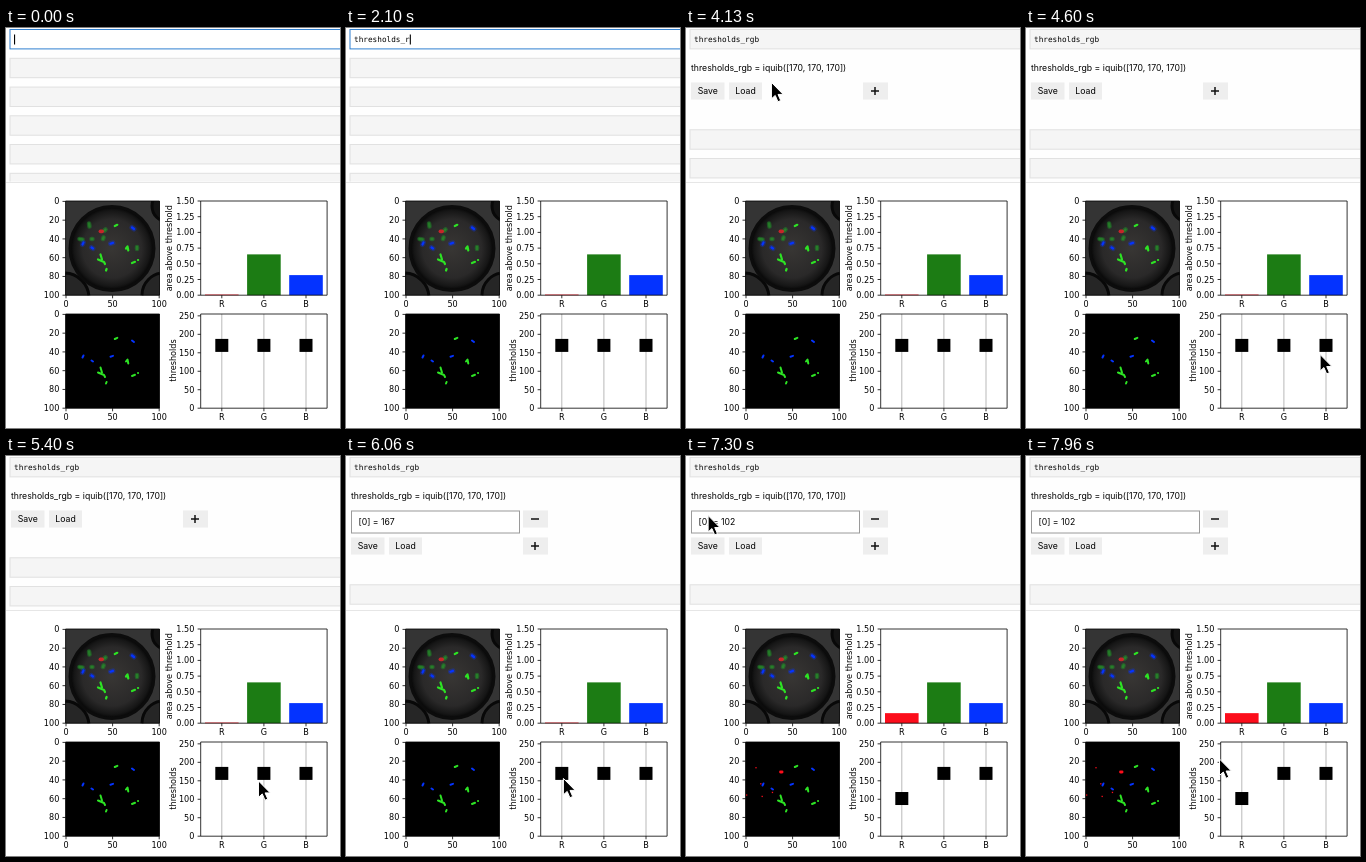
These frames come from a looping animation (334x400 px, 8000 ms). An HTML page:

```html
<!DOCTYPE html>
<html lang="en">
<head>
<meta charset="utf-8">
<title>Threshold notebook</title>
<style>
html, body { margin: 0; width: 100%; height: 100%; overflow: hidden; background: #fff; }
svg { display: block; width: 100vw; height: 100vh; }
text { white-space: pre; }
.ui { font-family: Inter, "Liberation Sans", sans-serif; font-size: 8.7px; fill: #000; }
.code { font-family: "DejaVu Sans Mono", monospace; font-size: 7.72px; fill: #000; }
.plot { font-family: "DejaVu Sans", sans-serif; font-size: 8.1px; fill: #000; }
</style>
</head>
<body>
<svg id="stage" viewBox="0 0 334 400" preserveAspectRatio="none">
  <defs>
    <clipPath id="bookClip"><rect width="334" height="153.5"/></clipPath>
    <clipPath id="photoClip"><rect x="59.5" y="173" width="94" height="94.3"/></clipPath>
    <radialGradient id="drop">
      <stop offset="0" stop-color="#383634"/>
      <stop offset=".7" stop-color="#2a2929"/>
      <stop offset=".9" stop-color="#161616"/>
      <stop offset="1" stop-color="#040404"/>
    </radialGradient>
  </defs>
</svg>
<script>
const LOOP = 8000;
const CODE = 'thresholds_rgb';
const CHAR = 4.648;
const RED = '#fc0d1b', GREEN = '#1c7c14', BLUE = '#0433ff', LIME = '#2de324';
const stage = document.getElementById('stage');

function add(parent, tag, attrs, text) {
  const el = document.createElementNS('http://www.w3.org/2000/svg', tag);
  set(el, attrs);
  if (text !== undefined) el.textContent = text;
  parent.appendChild(el);
  return el;
}
function set(el, attrs) {
  for (const k in attrs) el.setAttribute(k, attrs[k]);
}
function show(el, on) {
  el.setAttribute('visibility', on ? 'inherit' : 'hidden');
}
const clamp = v => Math.min(1, Math.max(0, v));
const group = (parent, attrs = {}) => add(parent, 'g', attrs);
const rect = (parent, x, y, width, height, fill, more = {}) =>
  add(parent, 'rect', { x, y, width, height, fill, ...more });
const label = (parent, x, y, text, cls, anchor = 'start') =>
  add(parent, 'text', { x, y, class: cls, 'text-anchor': anchor }, text);
const line = (parent, d, stroke = '#000', width = .8, more = {}) =>
  add(parent, 'path', { d, stroke, 'stroke-width': width, fill: 'none', ...more });

// Notebook
const book = group(stage, { 'clip-path': 'url(#bookClip)' });
rect(book, 0, 0, 334, 154, '#fefefe');
const cell = (parent, y) =>
  rect(parent, 4, y, 340, 19.4, '#f5f5f5', { stroke: '#e0e0e0', 'stroke-width': 1 });
const active = cell(book, 1.5);
const code = label(book, 8, 14.2, '', 'code');
const caret = rect(book, 8, 6.5, 1.1, 10, '#000');
const rest = group(book);
for (let i = 0; i < 5; i++) cell(rest, 30.3 + i * 28.75);

const output = label(book, 5, 42.6, CODE + ' = iquib([170, 170, 170])', 'ui');
function button(parent, x, y, w, text) {
  rect(parent, x, y, w, 17, '#eee');
  label(parent, x + w / 2, y + 11.6, text, 'ui', 'middle');
}
function signButton(parent, y, plus) {
  rect(parent, 177, y, 25, 17, '#eee');
  const cy = y + 8.5;
  line(parent, `M185 ${cy}h8` + (plus ? `M189 ${cy - 4}v8` : ''), '#111', 1.5);
}
const controls = group(book);
button(controls, 5, 54.5, 33.5, 'Save');
button(controls, 43, 54.5, 33, 'Load');
signButton(controls, 54.5, true);
const override = group(book);
rect(override, 5.5, 55, 168, 22, '#fff', { stroke: '#9a9a9a', 'stroke-width': 1 });
const valueText = label(override, 12.5, 69, '', 'ui');
signButton(override, 54.5, false);
line(stage, 'M0 154.5H334', '#e6e6e6', 1);

// Microscope picture in simple shapes
const photo = group(stage, { 'clip-path': 'url(#photoClip)' });
rect(photo, 59, 173, 95, 95, '#343434');
function disc(cx, cy, r, fill, stroke) {
  add(photo, 'circle', { cx, cy, r, fill, stroke, 'stroke-width': 3 });
}
disc(58, 270, 25, '#262626', '#080808');
disc(158, 267, 22, '#262626', '#080808');
disc(162, 178, 16, '#141414', '#080808');
disc(106, 220.5, 42, 'url(#drop)', '#0c0c0c');

const mask = group(stage);
rect(mask, 59.5, 286, 94, 94.3, '#000');

// Cells are short round strokes; bright ones appear in both pictures
const round = { 'stroke-linecap': 'round', 'stroke-linejoin': 'round' };
const blues = 'M76.5 216.5l1-2M85.5 219.5l1.5 1M104.5 215.7l2.5-.8M126 199.5l2 1.5';
const greens = 'M108.8 198l2.5-1.2M94.5 226.5l1.5 5M92 231.5l6 2.5l1 2M100 242.5l.6-1.5' +
  'M120 220.5l1.5-2l.8 4M126 235l3-1.2M132 232h.1';
const dim = 'M83 195.5l.5 3M73.5 211l3 .5M85.5 211h1M98.5 202.5l1-1M97 211l.6-1.6M131 219v2';
line(photo, dim, '#1f8a28', 4.6, { ...round, opacity: .5 });
line(photo, dim, '#28962a', 2.4, { ...round, opacity: .6 });
line(photo, blues, BLUE, 5, { ...round, opacity: .3 });
line(photo, 'M94.5 203.3h1.6', '#d8232a', 3.8, { ...round, opacity: .9 });
for (const [d, color] of [[blues, BLUE], [greens, LIME]]) {
  line(photo, d, color, 2.2, round);
  line(mask, d, color, 2, { ...round, transform: 'translate(0 113)' });
}
const redCell = line(mask, 'M94.5 316h1.6', RED, 2, round);

// Sparse red noise from a small seeded generator
const specks = group(mask);
let seed = 11;
const random = () => (seed = seed * 16807 % 2147483647) / 2147483647;
for (let i = 0; i < 5; i++)
  rect(specks, 60 + random() * 30, 308 + random() * 68, 1.3, 1.3, RED);

// Plots
function frame(x, y, w) {
  line(stage, `M${x} ${y}h${w}v94.2h${-w}z`);
}
function yTick(x, y, text) {
  line(stage, `M${x} ${y}h-3.1`);
  label(stage, x - 6.3, y + 3, text, 'plot', 'end');
}
function xTick(x, y, text) {
  line(stage, `M${x} ${y}v3.1`);
  label(stage, x, y + 12.1, text, 'plot', 'middle');
}
function title(x, y, text) {
  add(stage, 'text', { class: 'plot', 'text-anchor': 'middle', transform: `translate(${x} ${y}) rotate(-90)` }, text);
}
const barY = v => 267.2 - v * 62.8;
const levelY = v => 380.2 - v * .3694;
const columns = [0, 1, 2].map(i => 215.8 + i * 42.1);

const bars = [.01, .65, .32].map((v, i) =>
  rect(stage, columns[i] - 16.8, barY(v), 33.6, v * 62.8, [RED, GREEN, BLUE][i]));
columns.forEach(x => line(stage, `M${x} 286V380`, '#b9b9b9', 1));
const knobs = columns.map(x => rect(stage, x - 6.5, levelY(170) - 6.5, 13, 13, '#000'));

for (const top of [173, 286]) {
  frame(59.6, top, 93.9);
  frame(194.7, top, 126.4);
  for (let v = 0; v <= 100; v += 20) yTick(59.6, top + .4 + v * .938, v);
  for (let v = 0; v <= 100; v += 50) xTick(60 + v * .932, top + 94.2, v);
  columns.forEach((x, i) => xTick(x, top + 94.2, 'RGB'[i]));
}
for (let v = 0; v <= 1.5; v += .25) yTick(194.7, barY(v), v.toFixed(2));
for (let v = 0; v <= 250; v += 50) yTick(194.7, levelY(v), v);
title(166, 220.3, 'area above threshold');
title(169.7, 332.5, 'thresholds');

// Pointers
const arrow = add(stage, 'path', {
  d: 'M0 0V16.4L3.8 13L6.5 19.3L9.3 18.1L6.6 12H11.8Z',
  fill: '#000', stroke: '#fff', 'stroke-width': 1, 'stroke-linejoin': 'round'
});
const beam = group(stage);
const beamPath = 'M-3.5 -8.5Q0 -8.5 0 -6Q0 -8.5 3.5 -8.5M0 -6V6M-3.5 8.5Q0 8.5 0 6Q0 8.5 3.5 8.5M-1.8 2.5H1.8';
line(beam, beamPath, '#fff', 3);
line(beam, beamPath, '#000', 1.3);

// Each leg eases to a stop; bow bends it vertically
const legs = [
  { from: 3630, to: 4120, x: 82, y: 50 },
  { from: 4120, to: 4430, x: 147, y: 134 },
  { from: 4430, to: 4600, x: 294, y: 326.5 },
  { from: 4600, to: 4900, x: 319, y: 338 },
  { from: 4900, to: 5260, x: 270, y: 319 },
  { from: 5300, to: 5730, x: 217, y: 316, bow: 8 },
  { from: 5960, to: 6500, x: 218.5, y: 340 },
  { from: 6830, to: 7300, x: 22, y: 60 },
  { from: 7300, to: 7630, x: 52, y: 67, bow: -35 },
  { from: 7630, to: 7960, x: 193.5, y: 303 }
];
function pointerAt(t) {
  let px = 328.7, py = 10;
  for (const { from, to, x, y, bow = 0 } of legs) {
    const k = 1 - Math.pow(1 - clamp((t - from) / (to - from)), 1.5);
    px += (x - px) * k;
    py += (y - py) * k + bow * Math.sin(Math.PI * k);
  }
  return [px, py];
}

// Typing comes in evenly spaced bursts
const bursts = [
  { at: 760, gap: 100, count: 2 }, { at: 1000, gap: 115, count: 3 },
  { at: 1400, gap: 112, count: 6 }, { at: 2100, gap: 150, count: 3 }
];
const typedAt = t => bursts.reduce((n, { at, gap, count }) =>
  n + Math.min(count, Math.max(0, Math.floor((t - at) / gap) + 1)), 0);

// The drag lowers the red threshold in ten steps; the figure lags one step
const dragStep = t => Math.floor((t - 5960) / 67);
const dragAmount = step => Math.pow(clamp(step / 10), 1.33);

function draw(t) {
  const typed = typedAt(t);
  const focused = t < 2700;
  const printed = t >= 2750;
  const step = dragStep(t);
  const changed = step >= 1;
  set(active, { fill: focused ? '#fff' : '#f5f5f5', stroke: focused ? '#2f7fd0' : '#e0e0e0' });
  code.textContent = CODE.slice(0, typed);
  caret.setAttribute('x', 8 + typed * CHAR);
  show(caret, focused && !(t >= 260 && t < 600));

  show(output, printed);
  show(controls, t >= 2800);
  show(override, changed);
  controls.setAttribute('transform', `translate(0 ${changed ? 27 : 0})`);
  rest.setAttribute('transform', `translate(0 ${changed ? 98.5 : printed ? 71.5 : 0})`);
  valueText.textContent = `[0] = ${Math.round(170 - 68 * dragAmount(step))}`;

  const k = dragAmount(step - 1);
  const area = .01 + .15 * Math.pow(k, 1.66);
  set(bars[0], { y: barY(area), height: area * 62.8 });
  knobs[0].setAttribute('y', levelY(170 - 68 * k) - 6.5);
  show(redCell, k > 0);
  redCell.setAttribute('stroke-width', .8 + 2 * k);
  show(specks, k > .85);

  const [x, y] = pointerAt(t);
  const visible = t >= 3630;
  const inCode = y < 21;
  show(arrow, visible && !inCode);
  show(beam, visible && inCode);
  set(inCode ? beam : arrow, { transform: `translate(${x} ${y})` });
}

const start = performance.now();
function tick() {
  draw((performance.now() - start) % LOOP);
  requestAnimationFrame(tick);
}
tick();
</script>
</body>
</html>
```
